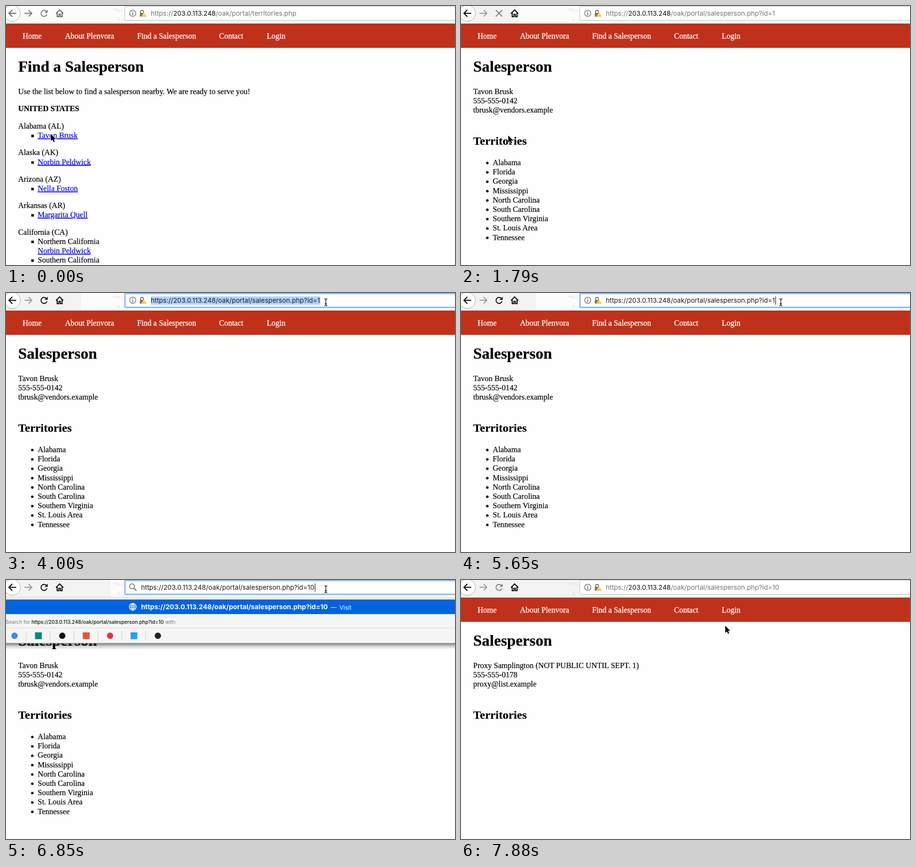
Recreate the animation shown at these times as an HTML page. Size 921 px wide and 532 px high, loop 8 s.

```html
<!DOCTYPE html>
<html lang="en">
<head>
<meta charset="utf-8">
<title>Salesperson lookup</title>
<style>
  html, body { margin: 0; width: 100%; height: 100%; overflow: hidden; background: #fefefe; }
  svg { display: block; width: 921px; height: 532px; font: 16px "Liberation Serif", serif; }
  .ui { font-family: Inter, sans-serif; }
  .url { font-size: 13.52px; }
  .body { stroke: #000; stroke-width: .2px; }
  .nav { fill: #fff; stroke: #fff; stroke-width: .3px; }
  .link { fill: #00e; stroke: #00e; text-decoration: underline; }
</style>
</head>
<body>
<svg id="stage" viewBox="0 0 921 532"></svg>
<script>
const stage = document.getElementById('stage');
const LOOP = 8000, TICK = 148.6;
const HOST = '203.0.113.248', DIR = '/oak/portal/';
const RED = '#bf311a';

const text = (x, y, s, attrs = '') => `<text x="${x}" y="${y}" ${attrs}>${s}</text>`;
const rect = (x, y, w, h, fill, attrs = '') =>
  `<rect x="${x}" y="${y}" width="${w}" height="${h}" fill="${fill}" ${attrs}/>`;
const line = (d, color, width = 2) =>
  `<path d="${d}" fill="none" stroke="${color}" stroke-width="${width}"/>`;
const dot = (x, y, r, fill, attrs = '') =>
  `<circle cx="${x}" cy="${y}" r="${r}" fill="${fill}" ${attrs}/>`;
const group = (name, content) => `<g class="${name}">${content}</g>`;
const heading = s => text(25, 135, s, 'font-size="32" font-weight="700"');

// Pointer path: tick, x, y
const path = [
  [0, 92, 263], [1, 92, 264], [4, 92, 264], [6, 97, 266], [15, 97, 266],
  [18, 202, 197], [20, 412, 79], [21, 412, 79], [22, 537, 38], [23, 585, 24],
  [26, 656, 19], [48, 656, 19], [53, 542, 94]
];

function pointerAt(n) {
  const i = path.findIndex(k => k[0] >= n);
  if (i < 1) return path[0].slice(1);
  const [a, ax, ay] = path[i - 1], [b, bx, by] = path[i];
  const p = (n - a) / (b - a);
  return [ax + (bx - ax) * p, ay + (by - ay) * p];
}

function pointer(n) {
  const [x, y] = pointerAt(n);
  let shape;
  if (y < 31) {
    const beam = 'M-3-7Q0-7 0-5Q0-7 3-7M0-5V5M-3 7Q0 7 0 5Q0 7 3 7M-2 3H2';
    shape = line(beam, '#fff', 3) + line(beam, '#111', 1.3);
  } else if (n > 0 && n < 12) {
    shape = '<path d="M-2 10V1Q-.5-1 1 1V6Q2.5 4.5 4 6.3Q5.5 5 7 7Q9 6 9.5 8.5V12L7.5 17H0L-5 11Q-6 8-4 8.5Z" fill="#fff" stroke="#000"/>';
  } else {
    shape = '<path d="M0 0V14.5L3.4 11.4L5.8 16.6L8 15.6L5.8 10.6H10.3Z" stroke="#fff" stroke-width="1.6" paint-order="stroke"/>';
  }
  return `<g transform="translate(${x} ${y})">${shape}</g>`;
}

function territories() {
  const rows = [
    [252, 'Alabama (AL)'], [271, 'Tavon Brusk', 1],
    [306, 'Alaska (AK)'], [325.5, 'Norbin Peldwick', 1],
    [360.5, 'Arizona (AZ)'], [380, 'Nella Foston', 1],
    [415, 'Arkansas (AR)'], [434, 'Margarita Quell', 1],
    [469.5, 'California (CA)'], [488.5, 'Northern California', 2],
    [508, 'Norbin Peldwick', 3], [527, 'Southern California', 2]
  ];
  return heading('Find a Salesperson') +
    text(25, 181, 'Use the list below to find a salesperson nearby. We are ready to serve you!') +
    text(25, 216, 'UNITED STATES', 'font-weight="700"') +
    rows.map(([y, s, kind]) =>
      text(kind ? 65 : 25, y, s, kind % 2 ? 'class="link"' : '') +
      (kind && kind < 3 ? rect(52, y - 6.5, 5, 5, '#000') : '')).join('');
}

function person(details, areas) {
  return heading('Salesperson') +
    details.map((s, i) => text(25, 181 + 19.2 * i, s)).join('') +
    text(25, 284.5, 'Territories', 'font-size="24" font-weight="700"') +
    areas.map((s, i) => {
      const y = 327 + 19.2 * i;
      return dot(54, y - 4.4, 2.5, '#000') + text(65, y, s);
    }).join('');
}

function page(n) {
  const nav = [[34, 'Home'], [121, 'About Plenvora'], [269, 'Find a Salesperson'], [437, 'Contact'], [535, 'Login']];
  const body = n < 12 ? territories()
    : n < 49 ? person(['Tavon Brusk', '555-555-0142', 'tbrusk@vendors.example'],
        ['Alabama', 'Florida', 'Georgia', 'Mississippi', 'North Carolina', 'South Carolina',
         'Southern Virginia', 'St. Louis Area', 'Tennessee'])
    : person(['Proxy Samplington (NOT PUBLIC UNTIL SEPT. 1)', '555-555-0178', 'proxy@list.example'], []);
  return group('body', body) + rect(0, 36, 921, 50, RED) + rect(0, 85, 921, 1, '#a93a28') +
    group('nav', nav.map(([x, s]) => text(x, 67, s)).join(''));
}

function buttons(n) {
  const ink = n < 1 ? '#6c6c6c' : '#0c0c0d';
  const loading = (n > 10 && n < 14) || (n > 46 && n < 50);
  const idle = n < 1 || (n > 13 && n < 18) || n > 49;
  const tint = n < 1 ? 0 : n < 18 ? 118 : n < 39 ? 154 : n < 47 ? 215 : 242;
  const reload = idle ? '#808080' : ink;
  return rect(0, 0, 921, 36, '#fcfcfc') + rect(0, 0, tint, 35, '#f3f3f3') +
    '<g transform="rotate(9 208 8)" font-family="Liberation Mono, monospace" font-size="9" fill="#d9d9e2">' +
      text(208, 8, ': &lt;ht=') + text(231, 27, '# ::.. -') + '</g>' +
    dot(13, 15, 16.5, '#fdfdfd', 'stroke="#aaa"') +
    line('M21 15H6M13 8L6 15L13 22', ink, 2.2) +
    line('M38 15H53M46.5 8.5L53 15L46.5 21.5', n < 1 ? '#777' : '#999') +
    (loading ? line('M71.5 8.5L84.5 21.5M84.5 8.5L71.5 21.5', '#808080')
      : line('M83 11.5A6.2 6.2 0 1 0 84 17', reload) +
        `<path d="M85.5 7.5V14H79Z" fill="${reload}"/>`) +
    line('M102.5 15.5L110 8L117.5 15.5M105 14V22H108.5V17H111.5V22H115V14', ink, 2.1);
}

function addressBar(n) {
  const focus = n > 25 && n < 47, typing = n > 38 && n < 47;
  const file = n < 12 ? 'territories.php' : 'salesperson.php?id=' + (n < 39 ? '1' : '10');
  const x = typing ? 277 : 297;
  const end = typing ? 633.5 : 645;
  const host = focus ? HOST : `<tspan fill="#0c0c0d">${HOST}</tspan>`;
  const box = focus
    ? rect(244, 1, 690, 28.5, '#fff', 'rx="2" stroke="#8dbcf2" stroke-width="3"')
    : rect(243.5, 1.5, 690, 29, '#dedede', 'rx="3"') + rect(243.5, .5, 690, 29, '#fff', 'rx="3" stroke="#bdbdbd"');
  const icons = typing
    ? dot(258.5, 13, 5, 'none', 'stroke="#888" stroke-width="2"') + line('M262 17L268 22', '#888', 2.4)
    : dot(260, 15, 6.4, 'none', 'stroke="#666" stroke-width="1.3"') +
      line('M260 14V19M260 11V12.7', '#666', 1.6) +
      line('M276 15V12Q276 9 279 9Q282 9 282 12V14', '#777', 1.8) +
      rect(274.5, 14, 9, 8, '#777', 'rx="1"') +
      '<path d="M283.3 13L289 22.5H277.6Z" fill="#ffbf00" stroke="#fff" stroke-width=".8"/>' +
      line('M283.3 16.3V19.3M283.3 20.3V21.5', '#fff', 1.2);
  return box + icons +
    (focus && n < 32 ? rect(297, 7, 348, 17, '#b0d4fd') : '') +
    text(x, 20, `https://${host}${DIR}${file}`, `class="ui url" fill="${focus ? '#1b1b1c' : '#737373'}"`) +
    (focus && n > 31 && (n - 30) % 8 < 4 ? rect(end, 7, 1, 17, '#000') : '');
}

function dropdown() {
  const url = `https://${HOST}${DIR}salesperson.php?id=10`;
  const engines = ['#4285f4', '#00897b', '#111', '#de5833', '#e53238', '#1da1f2', '#222'];
  return rect(0, 130, 921, 13, 'url(#shade)') +
    rect(0, 36, 921, 94, '#fbfbfb') + rect(0, 35, 921, 1, '#d0d0d0') +
    rect(0, 40, 921, 30, '#0363df') + rect(0, 70, 921, 60, '#f5f5f5') +
    rect(0, 98, 921, 1, '#d9d9d9') + rect(0, 129.5, 921, 1, '#8a8a8a') +
    dot(260, 55, 7, 'none', 'stroke="#fff" stroke-width="1.4"') +
    line('M253 55H267M260 48V62M254.5 51.5H265.5M254.5 58.5H265.5M260 48Q253.5 55 260 62Q266.5 55 260 48', '#fff', 1.2) +
    group('ui',
      text(277, 60, url, 'font-size="13.77" font-weight="700" fill="#fff"') +
      text(666, 60, '—', 'font-size="12" fill="#fff"') +
      text(684, 60.5, 'Visit', 'font-size="12" fill="#fff"') +
      text(-.5, 90, `Search for <tspan font-weight="500" fill="#111">${url}</tspan> with:`,
        'font-size="10.15" fill="#777"')) +
    engines.map((c, i) => {
      const x = 17.5 + 49 * i;
      return (i % 2 ? rect(x - 7, 107.5, 14, 14, c) : dot(x, 114.5, 6.5, c)) +
        (i < 6 ? rect(x + 23.5, 104, 1, 21, '#d0d0d0') : '');
    }).join('');
}

const defs = '<defs><linearGradient id="shade" x2="0" y2="1">' +
  '<stop stop-color="#000" stop-opacity=".5"/><stop offset=".5" stop-color="#000" stop-opacity=".16"/>' +
  '<stop offset="1" stop-color="#000" stop-opacity="0"/></linearGradient></defs>';

let shown = -1;
function render(now) {
  const n = Math.min(53, Math.floor((now % LOOP + 13) / TICK));
  if (n !== shown) {
    shown = n;
    stage.innerHTML = defs + page(n) + buttons(n) + addressBar(n) +
      (n > 38 && n < 47 ? dropdown() : '') + pointer(n);
  }
  requestAnimationFrame(render);
}
render(0);
</script>
</body>
</html>
```
